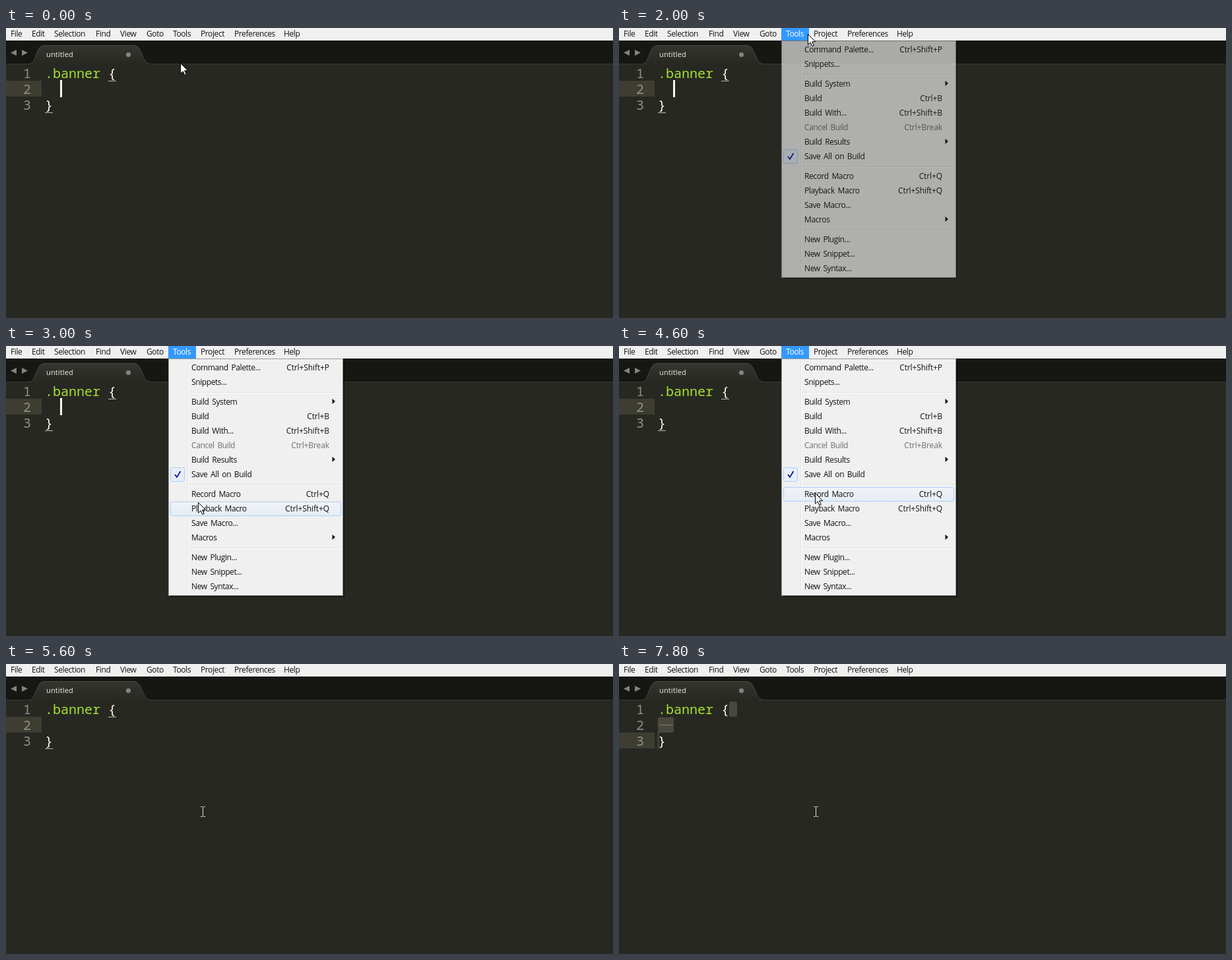
Animation, 920 px wide and 440 px high, one loop 8000 ms. Source, as an HTML page:

```html
<!DOCTYPE html>
<html lang="en">
<head>
<meta charset="utf-8">
<title>Editor macro recording</title>
<style>
html, body { margin: 0; width: 100%; height: 100%; overflow: hidden; background: #272822; }
svg { display: block; width: 920px; height: 440px; }
.ui { font: 12px "Open Sans", "Noto Sans", sans-serif; letter-spacing: -.4px; word-spacing: 2px; fill: #111; }
.keys { text-anchor: end; letter-spacing: -.1px; }
.off { fill: #6d6d6d; }
.tab { font: 11px "Open Sans", "Noto Sans", sans-serif; letter-spacing: .15px; fill: #f0f0ec; }
.code { font: 20px "Noto Sans Mono", "DejaVu Sans Mono", monospace; fill: #f8f8f2; }
.num { fill: #8f908a; }
.sel { fill: #a6e22e; }
.hot text { fill: #fff; }
.hot rect { fill: #39f; }
.caret { fill: #f8f8f0; }

/* One tick of 200 ms is 2.5% of the loop. */
.anim { animation: 8s step-end infinite; }
#caret { animation-name: blink; }
#endCaret { animation-name: endBlink; }
#selection { animation-name: select; }
#brackets { animation-name: brackets; }
#line { animation-name: line; }
#project { animation-name: project; }
#tools { animation-name: tools; }
#menu { animation-name: menu; }
#row { animation-name: row; }
#picked { animation-name: picked; }
#arrow { animation-name: arrow; }
#beam { animation-name: beam; }

@keyframes blink {
  0%, 12.5%, 25%, 37.5%, 50%, 65%, 77.5% { opacity: 1; }
  2.5%, 15%, 27.5%, 40%, 52.5% { opacity: .5; }
  5%, 17.5%, 30%, 42.5%, 55%, 70%, 82.5%, 100% { opacity: 0; }
  10%, 22.5%, 35%, 60% { opacity: .1; }
}
@keyframes endBlink {
  0%, 92.5% { opacity: 0; }
  82.5% { opacity: 1; }
  90% { opacity: .5; }
  97.5%, 100% { opacity: .1; }
}
@keyframes select { 0% { opacity: 0; } 82.5%, 100% { opacity: 1; } }
@keyframes brackets { 0% { opacity: 1; } 85%, 100% { opacity: 0; } }
@keyframes line { 0% { transform: none; } 82.5%, 100% { transform: translateY(24px); } }
@keyframes project { 0%, 15%, 100% { opacity: 0; } 12.5% { opacity: 1; } }
@keyframes tools { 0%, 62.5%, 100% { opacity: 0; } 15% { opacity: 1; } }
@keyframes menu {
  0%, 62.5%, 100% { opacity: 0; }
  25% { opacity: .68; }
  27.5% { opacity: 1; }
}
@keyframes row {
  0% { opacity: 0; transform: translateY(22px); }
  27.5% { opacity: 1; transform: translateY(22px); }
  30% { opacity: 1; transform: translateY(74px); }
  32.5% { opacity: 1; transform: translateY(184px); }
  35% { opacity: 1; transform: translateY(214px); }
  37.5% { opacity: 1; transform: translateY(236px); }
  40%, 100% { opacity: 1; transform: translateY(214px); }
}
@keyframes picked { 0%, 65%, 100% { opacity: 0; } 62.5% { opacity: .6; } }
@keyframes arrow {
  0% { opacity: 1; transform: translate(264px, 53px); }
  10% { opacity: 1; transform: translate(276px, 39px); }
  12.5% { opacity: 1; transform: translate(291px, 15px); }
  15% { opacity: 1; transform: translate(287px, 10px); }
  17.5% { opacity: 1; transform: translate(286px, 9px); }
  27.5% { opacity: 1; transform: translate(286px, 26px); }
  30% { opacity: 1; transform: translate(287px, 88px); }
  32.5% { opacity: 1; transform: translate(288px, 188px); }
  35% { opacity: 1; transform: translate(290px, 228px); }
  37.5% { opacity: 1; transform: translate(291px, 237px); }
  40% { opacity: 1; transform: translate(294px, 231px); }
  42.5% { opacity: 1; transform: translate(296px, 227px); }
  45% { opacity: 1; transform: translate(297px, 224px); }
  57.5% { opacity: 1; transform: translate(297px, 223px); }
  65%, 100% { opacity: 0; transform: translate(297px, 223px); }
}
@keyframes beam { 0% { opacity: 0; } 65%, 100% { opacity: 1; } }
</style>
</head>
<body>
<svg viewBox="0 0 920 440">
  <defs>
    <linearGradient id="tabFill" x2="0" y2="1">
      <stop stop-color="#34352e"/><stop offset="1" stop-color="#272822"/>
    </linearGradient>
    <linearGradient id="rowFill" x2="0" y2="1">
      <stop stop-color="#f1f3f6"/><stop offset="1" stop-color="#e4edf6"/>
    </linearGradient>
  </defs>

  <rect width="920" height="440" fill="#272822"/>
  <rect y="19" width="920" height="35" fill="#161712"/>
  <path d="M0 53.5H920" stroke="#10110d"/>
  <path d="M0 54.5H920" stroke="#3b3c35"/>
  <path d="M36 55C46 54 45 26.5 58 26.5H194C207 26.5 206 54 218 55Z" fill="url(#tabFill)"/>
  <path d="M36 54.5C46 54 45 26.5 58 26.5H194C207 26.5 206 54 218 54.5" fill="none" stroke="#484942"/>
  <path d="M16 33V42L7 37.5ZM24 33V42L33 37.5Z" fill="#83847f"/>
  <text class="tab" x="61" y="44">untitled</text>
  <circle cx="185.5" cy="40.5" r="3.6" fill="#83847f"/>

  <rect id="line" class="anim" y="80" width="54" height="24" fill="#3e3d32"/>
  <g id="selection" class="anim">
    <rect x="167" y="57" width="12" height="23" rx="2" fill="#49483e"/>
    <rect x="59" y="81" width="24" height="23" rx="2" fill="#49483e"/>
    <path d="M60 92.5H82" stroke="#7d7a68"/>
  </g>
  <g class="code">
    <g class="num"><text x="26" y="76">1</text><text x="26" y="100">2</text><text x="26" y="124">3</text></g>
    <text class="sel" x="59" y="76">.banner</text>
    <text x="155" y="76">{</text>
    <text x="59" y="124">}</text>
  </g>
  <path id="brackets" class="anim" d="M155 80.5H167M59 128.5H71" stroke="#b9b9a8"/>
  <rect id="caret" class="anim caret" x="82" y="79" width="3" height="26"/>
  <rect id="endCaret" class="anim caret" x="58" y="103" width="3" height="26"/>

  <rect width="920" height="19" fill="#f0f0f0"/>
  <g id="bar" class="ui"></g>
  <g id="project" class="ui hot anim"><rect x="288" width="51" height="19"/><text x="295" y="13">Project</text></g>
  <g id="tools" class="ui hot anim"><rect x="246" width="42" height="19"/><text x="253" y="13">Tools</text></g>

  <g id="menu" class="ui anim">
    <path d="M250 379H511V23H513V381H250Z" fill="#000" opacity=".4"/>
    <rect x="246.5" y="19.5" width="264" height="359" fill="#f0f0f0" stroke="#979797"/>
    <path d="M275.5 21V377" stroke="#e2e3e3"/>
    <path d="M276.5 21V377" stroke="#fff"/>
    <path d="M277 70.5H508M277 210.5H508M277 306.5H508" stroke="#e0e0e0"/>
    <path d="M277 71.5H508M277 211.5H508M277 307.5H508" stroke="#fff"/>
    <rect id="row" class="anim" x="249.5" y=".5" width="258" height="21" rx="2.5" fill="url(#rowFill)" stroke="#aecff7"/>
    <rect x="249.5" y="184.5" width="21" height="21" rx="2.5" fill="#e6eff8" stroke="#aecff7"/>
    <path d="M256 195L259 199L264.5 190" fill="none" stroke="#0c12a1" stroke-width="1.8"/>
    <g id="items"></g>
  </g>

  <g id="picked" class="ui anim">
    <rect x="249.5" y="214.5" width="258" height="21" rx="2.5" fill="url(#rowFill)" stroke="#aecff7"/>
    <text x="281" y="229">Record Macro</text>
    <text class="keys" x="490" y="229">Ctrl+Q</text>
  </g>

  <path id="beam" class="anim" d="M295 216.5H297.5L298.5 217.5L299.5 216.5H302M298.5 217V231M295 231.5H297.5L298.5 230.5L299.5 231.5H302" fill="none" stroke="#deded8"/>
  <path id="arrow" class="anim" d="M.5 .5V16.2L4.2 12.8L6.8 18.5L9.2 17.4L6.7 11.8H11.6Z" fill="#fff" stroke="#000"/>
</svg>
<script>
const bar = { File: 7, Edit: 39, Selection: 73, Find: 136, View: 173, Goto: 213,
  Tools: 253, Project: 295, Preferences: 346, Help: 421 };

// Label and shortcut; ">" marks a submenu, null a separator.
const items = [
  ["Command Palette...", "Ctrl+Shift+P"], ["Snippets..."], null,
  ["Build System", ">"], ["Build", "Ctrl+B"], ["Build With...", "Ctrl+Shift+B"],
  ["Cancel Build", "Ctrl+Break"], ["Build Results", ">"], ["Save All on Build"], null,
  ["Record Macro", "Ctrl+Q"], ["Playback Macro", "Ctrl+Shift+Q"], ["Save Macro..."], ["Macros", ">"], null,
  ["New Plugin..."], ["New Snippet..."], ["New Syntax..."]
];

const text = (x, y, label, cls = "") => `<text x="${x}" y="${y}" class="${cls}">${label}</text>`;

function menuItems() {
  let y = 37, out = "";
  for (const item of items) {
    if (!item) { y += 8; continue; }
    const [label, keys] = item;
    const off = label === "Cancel Build" ? "off" : "";
    out += text(281, y, label, off);
    if (keys === ">") out += `<path d="M494.5 ${y - 9}v8l4.5-4z"/>`;
    else if (keys) out += text(490, y, keys, "keys " + off);
    y += 22;
  }
  return out;
}

document.getElementById("bar").innerHTML =
  Object.entries(bar).map(([label, x]) => text(x, 13, label)).join("");
document.getElementById("items").innerHTML = menuItems();
</script>
</body>
</html>
```
